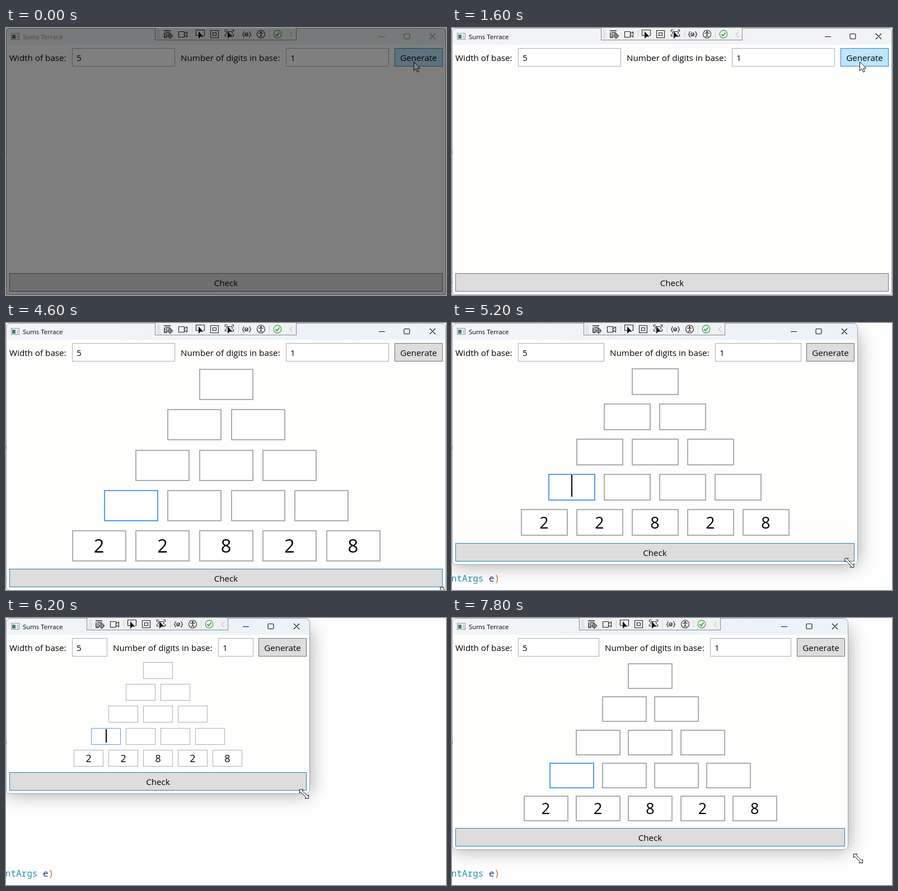
Animation of 786 by 478 pixels, one loop 8 s. Source, as an HTML page:

```html
<!DOCTYPE html>
<html lang="en">
<head>
<meta charset="utf-8">
<title>Sums Terrace</title>
<style>
  html, body { margin: 0; width: 100%; height: 100%; overflow: hidden; background: #fefefe; }
  svg { display: block; width: 786px; height: 478px; }
  text { font: 15.2px "Open Sans", "Noto Sans", sans-serif; fill: #000; white-space: pre; }
  .mid { text-anchor: middle; }
  .code { font: 500 16px "Noto Sans Mono", "DejaVu Sans Mono", monospace; }
  .crisp { shape-rendering: crispEdges; }
  .line { fill: none; stroke: #222; stroke-width: 1.1; }
</style>
</head>
<body>
<svg id="stage" viewBox="0 0 786 478">
  <defs>
    <filter id="blur" x="-20%" y="-20%" width="140%" height="150%"><feGaussianBlur stdDeviation="17"/></filter>
    <linearGradient id="mica"><stop offset="0" stop-color="#f2f4f8"/><stop offset="1" stop-color="#ebf3f9"/></linearGradient>
  </defs>
  <rect width="786" height="478" fill="#fefefe"/>
  <text class="code" x="-1.2" y="463" style="fill:#2b91af">ntArgs <tspan fill="#1f377f">e</tspan><tspan fill="#b0741f">)</tspan></text>
  <rect id="shadow" y="19" rx="8" opacity=".36" filter="url(#blur)"/>
  <rect id="frame" x=".5" y=".5" rx="8" stroke="#9c9ea2"/>
  <path id="content" fill="#fefefd"/>

  <g class="crisp">
    <rect x="9.5" y="9.5" width="14" height="11" fill="#f4f6f8" stroke="#8d9499"/>
    <rect x="11" y="12" width="6" height="7" fill="#3d8274"/>
    <rect x="19" y="12" width="3" height="7" fill="#c6cdd4"/>
  </g>
  <text id="title" x="30" y="20" style="font-size:11.4px">Sums Terrace</text>
  <path id="buttons" fill="none" stroke-width="1.1" d="M-120 15.5h11M-73.5 10.5h7q1.500 0 1.500 1.500v6q0 1.500-1.500 1.500h-7q-1.500 0-1.500-1.500v-6q0-1.500 1.500-1.500zM-29 10l10 10M-19 10l-10 10"/>

  <g id="toolbar">
    <rect class="crisp" x=".5" y="-.5" width="252" height="22" fill="#f0f1f3" stroke="#85878b"/>
    <path stroke="#a5a7ab" stroke-dasharray="1 2" d="M4.500 3v16M6.500 4.500v14M8.500 3v16"/>
    <path class="crisp" stroke="#cfd1d4" d="M66.500 4v14M149.500 4v14M204.500 4v14"/>
    <g class="line">
      <path d="M16 5h12M17 8v9h5M19 8.500h8M19 11.500h3M19 14.500h3" stroke-width="1.500"/>
      <circle cx="27" cy="14" r="3.500"/><path d="M27 8.500v11M21.500 14h11"/>
      <path d="M42.500 6.500h10v10h-10zM52.500 10l5-3v9l-5-3"/>
      <path d="M80 13.500h-6.500v-10h15v10h-2"/>
      <path d="M99.500 4.500h14v13h-14zM103.500 8.500h6v5h-6z"/>
      <path d="M125.500 7v-3.500h4M137 3.500h3.500v3.500M125.500 11v3.500h3M140.500 11v3.500h-3M128 6.500h10v5M128 6.500v5"/>
      <path d="M160 6.500q-2 0-2 2v1l-1.500 2 1.500 1.500v1q0 2 2 2M168 6.500q2 0 2 2v1l1.500 2-1.500 1.500v1q0 2-2 2"/>
      <circle cx="163.500" cy="11.500" r="2.800"/><path d="M162 11.500l1.500 1.500 3-4"/>
      <circle cx="189.500" cy="11" r="7"/><path d="M185 9l4.500 1 4.500-1M189.500 10v3M187 16.500l2.500-4 2.500 4"/>
    </g>
    <path fill="#111" d="M78 6v13l3.500-3.500h5zM130 6v13l3.500-3.500h5z"/>
    <circle cx="189.500" cy="7.200" r="1.500" fill="#111"/>
    <circle cx="219" cy="11" r="6.800" fill="#e9f5ea" stroke="#3b9a4b" stroke-width="1.200"/>
    <path fill="none" stroke="#2b8c3c" stroke-width="1.500" d="M215.500 11l2.500 3 4.500-6"/>
    <path fill="none" stroke="#a9a5a7" d="M246 7l-5 4.500 5 4.500"/>
  </g>

  <text x="6" y="59">Width of base:</text>
  <rect id="field1" class="crisp" x="118.500" y="36.500" height="32" fill="#fff" stroke="#abadb3"/>
  <text x="126" y="59">5</text>
  <g id="digits">
    <text x="0" y="59">Number of digits in base:</text>
    <rect id="field2" class="crisp" x="188.500" y="36.500" height="32" fill="#fff" stroke="#abadb3"/>
    <text x="196" y="59">1</text>
  </g>
  <g id="generate">
    <rect id="generateBox" class="crisp" x=".5" y="36.500" width="85" height="32"/>
    <text class="mid" x="43" y="59" textLength="">Generate</text>
  </g>
  <g id="pyramid"></g>
  <rect id="caret" class="crisp"/>
  <rect id="checkBox" class="crisp" x="6.500" height="32"/>
  <text id="check" class="mid">Check</text>

  <path class="crisp" stroke="#666" d="M.5 220v6M.5 454v3"/>
  <path id="arrow" fill="#fff" stroke="#111" stroke-linejoin="round" d="M.5.5v16l3.700-3.500 2.700 6 2.500-1.200-2.600-5.700h5z"/>
  <path id="resize" fill="#fff" stroke="#111" d="M-8-8h6.500l-2 2L6 3.500l2-2V8H1.500l2-2L-6-3.500l-2 2z"/>
  <rect id="dim" width="786" height="478"/>
</svg>
<script>
const LOOP = 8000, STEP = 200;
const ACTIVATE = 1200, PRESS = 1400, GENERATE = 1920, GRAB = 4200, BLINK = 530;
const $ = id => document.getElementById(id);
const set = (el, attrs) => { for (const k in attrs) el.setAttribute(k, attrs[k]); };
const move = (id, x, y = 0) => set($(id), { transform: `translate(${x} ${y})` });

// [time, x, y]
const windowKeys = [
  [4400, 786, 478], [4600, 786, 479], [5000, 756, 457], [5600, 662, 386], [6000, 576, 334],
  [6400, 510, 295], [6600, 502, 290], [7000, 536, 310], [7800, 708, 415]
];
const cursorKeys = [
  [2200, 728, 60], [2600, 742, 220], [3000, 737, 430], [3200, 734, 451], [3400, 734, 451],
  [4000, 776, 474], [4200, 784, 480], [4600, 784, 481], [5000, 743, 453], [5600, 643.5, 382],
  [6000, 560, 332], [6400, 505, 298], [6600, 506, 300], [7000, 544.5, 325], [7800, 725.5, 430.5]
];

function at(keys, t) {
  const i = keys.findIndex(k => k[0] >= t);
  if (i === 0) return keys[0].slice(1);
  if (i < 0) return keys[keys.length - 1].slice(1);
  const [a, b] = [keys[i - 1], keys[i]], u = (t - a[0]) / (b[0] - a[0]);
  return [1, 2].map(n => a[n] + (b[n] - a[n]) * u);
}

function add(tag, attrs, text = "") {
  const el = document.createElementNS("http://www.w3.org/2000/svg", tag);
  set(el, attrs);
  el.textContent = text;
  return $("pyramid").appendChild(el);
}

const base = [2, 2, 8, 2, 8];
const cells = [];
for (let row = 0; row < 5; row++) {
  for (let col = 0; col <= row; col++) {
    const focused = row === 3 && col === 0;
    cells.push({
      row, col, focused,
      box: add("rect", { class: "crisp", fill: "#fff", stroke: focused ? "#569de5" : "#abadad" }),
      label: row === 4 ? add("text", { class: "mid" }, base[col]) : null
    });
  }
}

function paintButton(id, hover, pressed, idleStroke) {
  set($(id), {
    fill: pressed ? "#c4e5f6" : hover ? "#bee6fd" : "#dddddd",
    stroke: pressed ? "#2c628b" : hover ? "#3c7fb1" : idleStroke
  });
}

function drawWindow(w, h, t) {
  const active = t >= ACTIVATE;
  set($("shadow"), { width: w, height: h - 19 });
  set($("frame"), { width: w - 1, height: h - 1, fill: t < GENERATE ? "#f2f3f6" : "url(#mica)" });
  set($("content"), { d: `M1 30H${w - 1}V${h - 8}a7 7 0 0 1-7 7H8a7 7 0 0 1-7-7z` });
  $("title").style.fill = active ? "#000" : "#8c8c8c";
  $("buttons").setAttribute("stroke", active ? "#111" : "#8c8c8c");
  move("buttons", w);
  move("toolbar", Math.floor(w / 2) - 127);

  const field = Math.round((w - 418) / 2);
  set($("field1"), { width: field - 1 });
  set($("field2"), { width: field - 1 });
  move("digits", 128 + field);
  move("generate", w - 92);
  set($("checkBox"), { y: h - 38.5, width: w - 13 });
  set($("check"), { x: w / 2, y: h - 16 });
}

function drawPyramid(w, h, t) {
  const shown = t >= GENERATE, s = (h - 118) / 210, line = s > 1.15 ? 2 : 1;
  $("pyramid").style.display = shown ? "" : "none";
  $("caret").style.display = shown && (t - GENERATE) % (2 * BLINK) < BLINK ? "" : "none";
  for (const { row, col, focused, box, label } of cells) {
    const cx = w / 2 + (col - row / 2) * 66 * s, cy = 74 + (row + 0.5) * 42 * s;
    const x = Math.round(cx - 28 * s), y = Math.round(cy - 16.2 * s);
    set(box, {
      x: x + line / 2, y: y + line / 2, "stroke-width": line,
      width: Math.round(56.3 * s) - line, height: Math.round(32.3 * s) - line
    });
    if (label) {
      set(label, { x: cx, y: cy + 6.8 * s });
      label.style.fontSize = 19 * s + "px";
    }
    if (focused) {
      set($("caret"), { x: Math.round(cx) - 1, y: Math.round(y + 1.6 * s), width: 2, height: Math.round(25.8 * s) });
    }
  }
}

function draw(time) {
  const t = Math.floor(time / STEP) * STEP;
  const [w, h] = at(windowKeys, t).map(Math.round);
  const [cx, cy] = at(cursorKeys, t);
  const dragging = t >= GRAB;
  drawWindow(w, h, t);
  drawPyramid(w, h, t);

  const overCheck = !dragging && cx < w - 6 && cy > h - 39 && cy < h - 6;
  paintButton("generateBox", cy < 70, t === PRESS, "#707070");
  paintButton("checkBox", overCheck, false, t < GENERATE ? "#707070" : "#1f80b5");

  move("arrow", cx, cy);
  move("resize", cx, cy);
  $("arrow").style.display = dragging ? "none" : "";
  $("resize").style.display = dragging ? "" : "none";
  set($("dim"), { opacity: Math.max(0, 0.5 * (1 - t / 600)) });
}

$("generate").lastElementChild.removeAttribute("textLength");
const start = performance.now();
function tick() {
  draw((performance.now() - start) % LOOP);
  requestAnimationFrame(tick);
}
tick();
</script>
</body>
</html>
```
